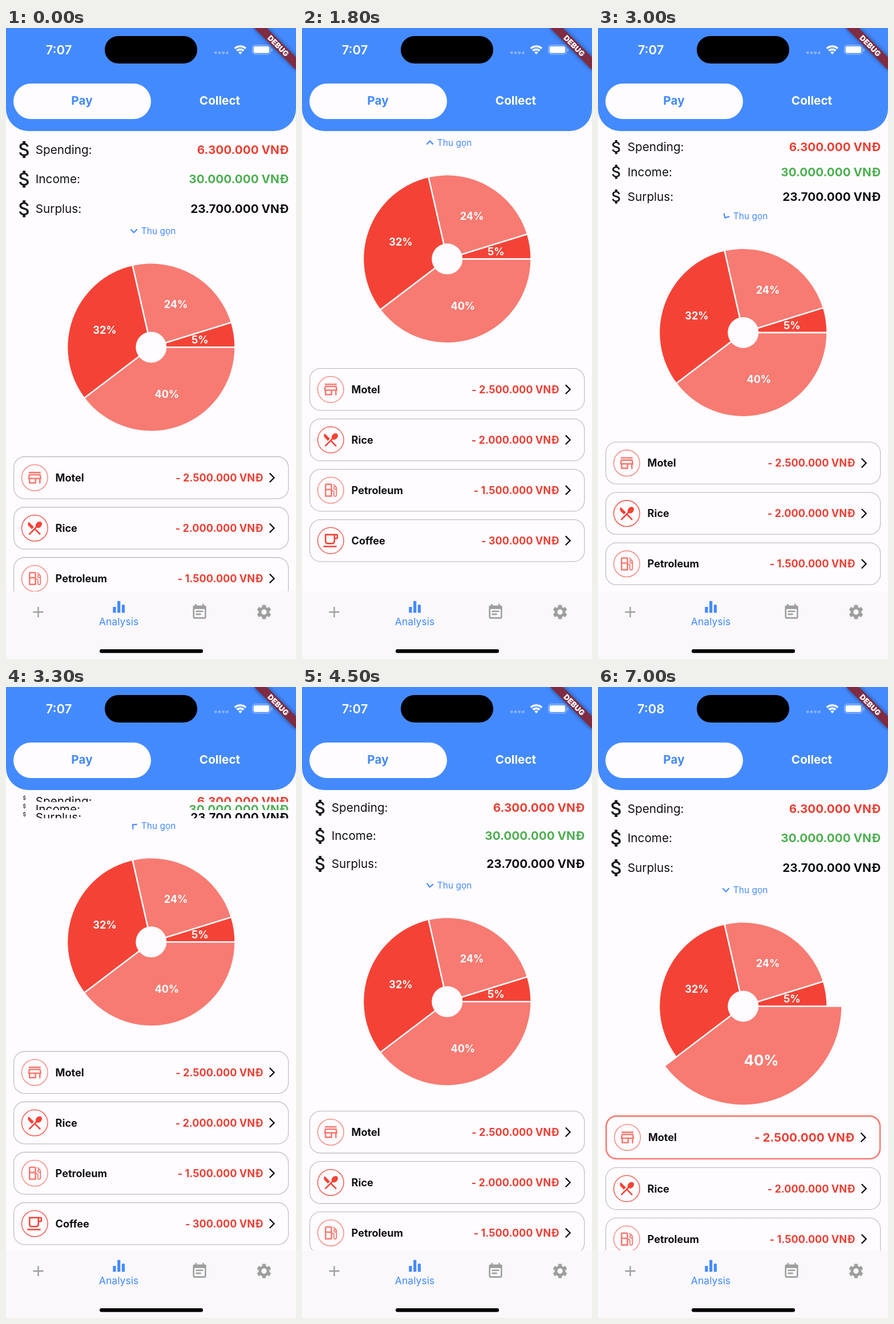
Write an HTML page that moves like this. It is 508 by 1102 pixels and loops after 8 s.

```html
<!DOCTYPE html>
<html lang="en">
<head>
<meta charset="utf-8">
<title>Spending analysis</title>
<style>
  html, body { margin: 0; width: 100%; height: 100%; overflow: hidden; background: #fffcff; }
  svg { display: block; }
  text { font-family: Inter, "Open Sans", sans-serif; white-space: pre; }
</style>
</head>
<body>
<svg id="stage" width="508" height="1102" viewBox="0 0 508 1102">
  <g id="content"></g>
  <g id="chrome"></g>
</svg>
<script>
const LOOP = 8000, STEP = 100;
const BG = '#fffcff', BLUE = '#448aff', RED = '#f44336', PINK = '#f77b72';
const AMOUNT_RED = '#ea4034', GREY = '#9e9e9e', INK = '#111014';

const ICONS = {
  dollar: 'M11.8 10.9c-2.27-.59-3-1.2-3-2.15 0-1.09 1.01-1.85 2.7-1.85 1.78 0 2.44.85 2.5 2.1h2.21c-.07-1.72-1.12-3.3-3.21-3.81V3h-3v2.16c-1.94.42-3.5 1.68-3.5 3.61 0 2.31 1.91 3.46 4.7 4.13 2.5.6 3 1.48 3 2.41 0 .69-.49 1.79-2.7 1.79-2.06 0-2.87-.92-2.98-2.1h-2.2c.12 2.19 1.76 3.42 3.68 3.83V21h3v-2.15c1.95-.37 3.5-1.5 3.5-3.55 0-2.84-2.43-3.81-4.7-4.4z',
  down: 'M7.41 8.59L12 13.17l4.59-4.58L18 10l-6 6-6-6z',
  next: 'M6.23 20.23L8 22l10-10L8 2 6.23 3.77 14.46 12z',
  shop: 'M18.36 9l.6 3H5.04l.6-3h12.72M20 4H4v2h16V4zm0 3H4l-1 5v2h1v6h10v-6h4v6h2v-6h1v-2l-1-5zM6 18v-4h6v4H6z',
  meal: 'M8.1 13.34l2.83-2.83L3.91 3.5c-1.56 1.56-1.56 4.09 0 5.66l4.19 4.18zm6.78-1.81c1.53.71 3.68.21 5.27-1.38 1.91-1.91 2.28-4.65.81-6.12-1.46-1.46-4.2-1.1-6.12.81-1.59 1.59-2.09 3.74-1.38 5.27L3.7 19.87l1.41 1.41L12 14.41l6.88 6.88 1.41-1.41L13.41 13l1.47-1.47z',
  fuel: 'M19.77 7.23l-3.71-3.73L15 4.56l2.11 2.11C16.17 7.03 15.5 7.93 15.5 9c0 1.38 1.12 2.5 2.5 2.5.36 0 .69-.08 1-.21v7.21c0 .55-.45 1-1 1s-1-.45-1-1V14c0-1.1-.9-2-2-2h-1V5c0-1.1-.9-2-2-2H6c-1.1 0-2 .9-2 2v16h10v-7.5h1.5v5c0 1.38 1.12 2.5 2.5 2.5s2.5-1.12 2.5-2.5V9c0-.69-.28-1.32-.73-1.77zM18 10c-.55 0-1-.45-1-1s.45-1 1-1 1 .45 1 1-.45 1-1 1zM6 12h6v7H6zM6 5h6v5H6z',
  cup: 'M16 5v8c0 1.1-.9 2-2 2H8c-1.1 0-2-.9-2-2V5h10m4-2H4v10c0 2.21 1.79 4 4 4h6c2.21 0 4-1.79 4-4v-3h2c1.11 0 2-.9 2-2V5c0-1.11-.89-2-2-2zm-2 5V5h2v3h-2zM20 19H2v2h18v-2z',
  plus: 'M19 12.9h-6.1V19h-1.8v-6.1H5v-1.8h6.1V5h1.8v6.1H19z',
  bars: 'M4 12h4v8H4zM16 9h4v11h-4zM10 4h4v16h-4z',
  notes: 'M19 3h-1V1h-2v2H8V1H6v2H5c-1.11 0-2 .9-2 2v14c0 1.1.89 2 2 2h14c1.1 0 2-.9 2-2V5c0-1.1-.9-2-2-2zm0 16H5V8h14v11zM7 10h10v2H7zM7 14h7v2H7z'
};

const TOTALS = [
  ['Spending:', '6.300.000 VNĐ', AMOUNT_RED],
  ['Income:', '30.000.000 VNĐ', '#4caf50'],
  ['Surplus:', '23.700.000 VNĐ', INK]
];
const ITEMS = [
  { name: 'Motel', icon: 'shop', color: PINK, value: 25, amount: '- 2.500.000 VNĐ' },
  { name: 'Rice', icon: 'meal', color: RED, value: 20, amount: '- 2.000.000 VNĐ' },
  { name: 'Petroleum', icon: 'fuel', color: PINK, value: 15, amount: '- 1.500.000 VNĐ' },
  { name: 'Coffee', icon: 'cup', color: RED, value: 3, amount: '- 300.000 VNĐ' }
];
const SUM = ITEMS.reduce((sum, item) => sum + item.value, 0);

// [time, value] pairs, linear in between
const OPEN = [[400, 1], [500, .4], [600, 0], [1700, 0], [1800, .006], [2300, .921], [2400, 1], [2900, 1],
  [3000, .835], [3400, .09], [3500, 0], [3900, 0], [4000, .012], [4500, .948], [5000, .948], [5100, 1]];
const PICKED = [
  [[6800, 0], [6900, .65], [7000, 1]],
  [[5800, 0], [5900, 1], [6800, 1], [6900, .35], [7000, 0]],
  [[0, 0]],
  [[0, 0]]
];

function track(keys, t) {
  const next = keys.findIndex(key => key[0] >= t);
  if (next < 0) return keys[keys.length - 1][1];
  if (next === 0) return keys[0][1];
  const [t0, v0] = keys[next - 1], [t1, v1] = keys[next];
  return v0 + (v1 - v0) * (t - t0) / (t1 - t0);
}

// Text is centred vertically on its capitals
const text = (x, cy, str, size, fill, anchor = 'start', weight = 700) =>
  `<text x="${x}" y="${cy + size * .36}" font-size="${size}" fill="${fill}" text-anchor="${anchor}" font-weight="${weight}">${str}</text>`;
const icon = (name, cx, cy, size, fill, turn = 0) =>
  `<path d="${ICONS[name]}" fill="${fill}" fill-rule="evenodd" transform="translate(${cx} ${cy}) rotate(${turn}) scale(${size / 24}) translate(-12 -12)"/>`;
const rect = (x, y, w, h, r, attrs) =>
  `<rect x="${x}" y="${y}" width="${w}" height="${h}" rx="${r}" ${attrs}/>`;

function totals(h) {
  return TOTALS.map(([label, amount, color], i) => {
    const cy = Math.max(h / 2, 13);
    return `<svg y="${186.4 + i * h}" width="508" height="${h}">` +
      icon('dollar', 32.5, h / 2, h * .76, '#1c1b1f') +
      text(51.8, cy, label, 20.7, INK, 'start', 400) +
      text(495.3, cy, amount, 20.7, color, 'end') + '</svg>';
  }).join('');
}

function pie(cx, cy, picked) {
  let slices = '', gaps = '', labels = '', from = 0;
  const at = (angle, r) => `${cx + r * Math.cos(angle)} ${cy + r * Math.sin(angle)}`;
  ITEMS.forEach((item, i) => {
    const share = item.value / SUM, to = from + share * 2 * Math.PI, mid = (from + to) / 2;
    const r = 146 + 26 * picked[i], labelR = (r + 27) / 2;
    slices += `<path d="M${cx} ${cy}L${at(from, r)}A${r} ${r} 0 0 1 ${at(to, r)}z" fill="${item.color}"/>`;
    gaps += `<path d="M${cx} ${cy}L${at(from, 174)}" stroke="${BG}" stroke-width="2.6"/>`;
    labels += text(cx + labelR * Math.cos(mid), cy + labelR * Math.sin(mid), Math.round(share * 100) + '%',
      18.1 + 7.7 * picked[i], '#fff', 'middle');
    from = to;
  });
  return slices + gaps + `<circle cx="${cx}" cy="${cy}" r="27" fill="${BG}"/>` + labels;
}

function cards(top, picked) {
  return ITEMS.map((item, i) => {
    const on = picked[i] > .5, line = on ? 2.6 : 1.3, pad = on ? 1.3 : 0;
    const h = 74.6 + 2 * pad, cy = top + h / 2;
    const card = rect(13 + line / 2, top + line / 2, 482.4 - line, h - line, 19.4 - line / 2,
        `fill="none" stroke="${on ? item.color : '#c2c0c4'}" stroke-width="${line}"`) +
      `<circle cx="${50.3 + pad}" cy="${cy}" r="22.8" fill="none" stroke="${item.color}" stroke-width="1.3"/>` +
      icon(item.icon, 50.3 + pad, cy, 31, item.color) +
      text(86.6 + pad, cy, item.name, 18.1, INK) +
      text(450.5 - pad, cy, item.amount, on ? 20.7 : 18.1, AMOUNT_RED, 'end') +
      icon('next', 466 - pad, cy, 20.7, '#000');
    top += h + 13.4;
    return card;
  }).join('');
}

function content(t) {
  const open = track(OPEN, t), picked = PICKED.map(keys => track(keys, t));
  const h = 51.7 * open, toggle = 199.4 + 3 * h;
  return totals(h) +
    icon('down', 224, toggle, 25.8, BLUE, 180 * (1 - open)) +
    text(236.8, toggle, 'Thu gọn', 15.5, BLUE, 'start', 400) +
    pie(254.3, toggle + 203, picked) +
    cards(toggle + 393.6, picked);
}

function gear(cx, cy) {
  const teeth = [0, 60, 120].map(a =>
    `<path d="M0-9.7V-6M0 6V9.7" stroke-width="4.8" transform="rotate(${a})"/>`).join('');
  return `<g transform="translate(${cx} ${cy}) scale(1.29)" fill="none" stroke="${GREY}"><circle r="5.5" stroke-width="3.8"/>${teeth}</g>`;
}

function wifi(cx, cy) {
  const arc = (r, width) =>
    `<path d="M${cx - r * .68} ${cy - r * .73}A${r} ${r} 0 0 1 ${cx + r * .68} ${cy - r * .73}" fill="none" stroke="#fff" stroke-width="${width}"/>`;
  return arc(14, 3.6) + arc(8.7, 3.6) + arc(2.4, 4.8);
}

function chrome(t) {
  const dots = [0, 1, 2, 3].map(i => rect(365 + i * 6.7, 41, 4.6, 4.6, 1.6, 'fill="#fff" opacity=".35"')).join('');
  return rect(0, 984, 508, 118, 0, 'fill="#faf8fb"') +
    icon('plus', 56.5, 1020, 31, GREY) +
    icon('bars', 197.7, 1011, 31, BLUE) +
    text(197.5, 1037, 'Analysis', 17.6, BLUE, 'middle', 400) +
    icon('notes', 339, 1020, 31, GREY) + gear(452, 1020) +
    rect(164, 1085, 181, 6.5, 3.2, 'fill="#000"') +
    `<path d="M0 0H508V141a39 39 0 0 1-39 39H39a39 39 0 0 1-39-39z" fill="${BLUE}"/>` +
    rect(13, 97, 241, 62, 31, `fill="${BG}"`) +
    text(133, 127, 'Pay', 20.7, BLUE, 'middle') +
    text(374.5, 127, 'Collect', 20.7, '#fff', 'middle') +
    text(92.5, 38.5, t < 5500 ? '7:07' : '7:08', 22, '#fff', 'middle', 600) +
    rect(173, 14, 162, 48, 24, 'fill="#000"') + dots + wifi(410.4, 46) +
    rect(431.6, 30, 31.6, 15.8, 5, 'fill="none" stroke="#fff" stroke-opacity=".45" stroke-width="1.3"') +
    rect(433.6, 32, 27.6, 11.8, 3.2, 'fill="#fff"') +
    rect(464.8, 35.3, 1.8, 5.4, .9, 'fill="#fff" opacity=".5"') +
    '<g transform="translate(508 0) rotate(45)">' +
    rect(-51.7, 36.2, 103.4, 15.5, 0, 'fill="#7f2b41" style="filter:drop-shadow(0 0 4px rgba(0,0,0,.5))"') +
    text(0, 44, 'DEBUG', 13.2, '#fff', 'middle', 900) + '</g>';
}

const contentLayer = document.getElementById('content');
const chromeLayer = document.getElementById('chrome');
let shown = -1;

function frame() {
  const t = Math.floor(performance.now() % LOOP / STEP) * STEP;
  if (t !== shown) {
    shown = t;
    contentLayer.innerHTML = content(t);
    chromeLayer.innerHTML = chrome(t);
  }
  requestAnimationFrame(frame);
}
frame();
</script>
</body>
</html>
```
